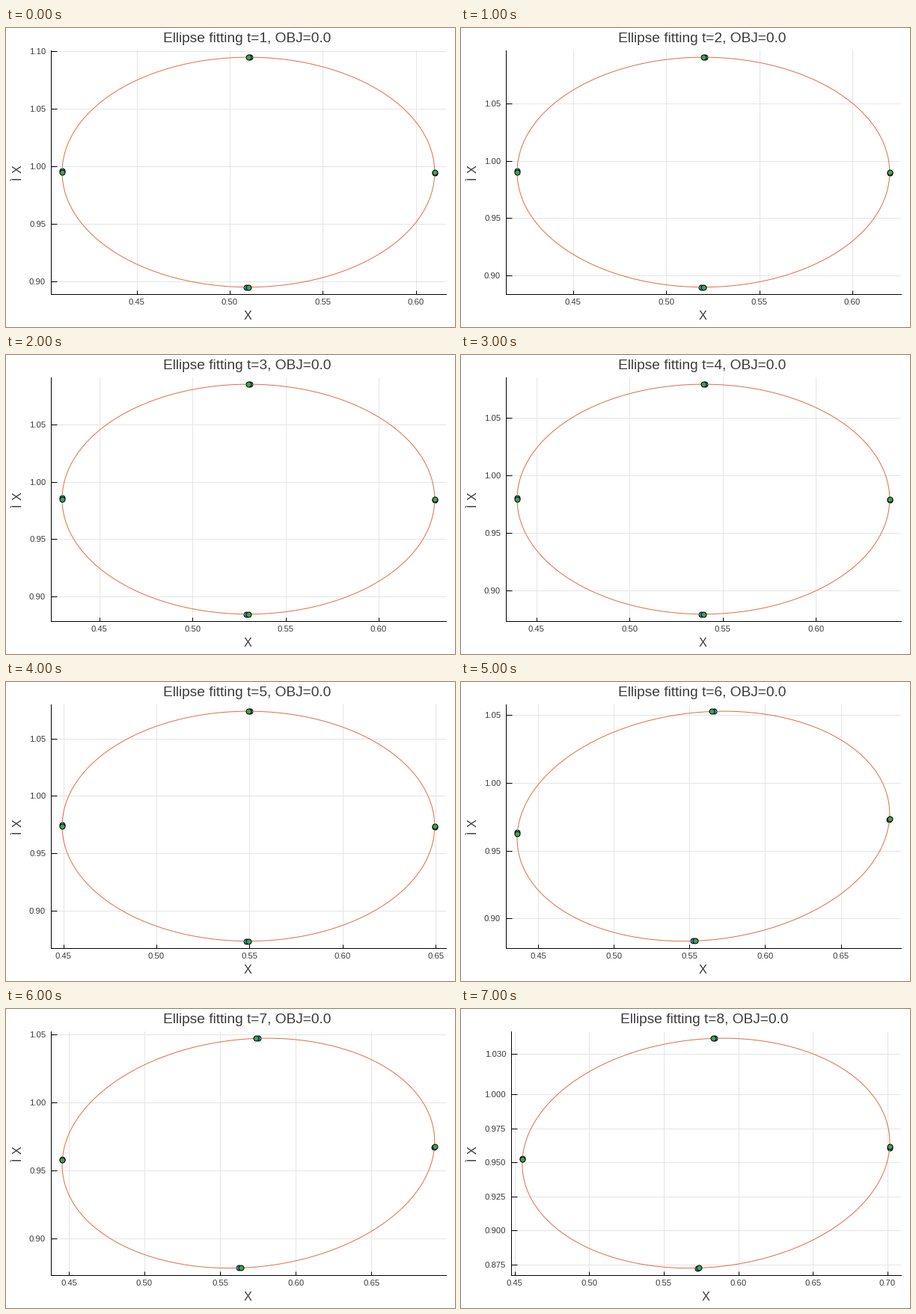
Recreate the animation shown at these times as a matplotlib script. Size 600 px wide and 400 px high, loop 8000 ms.

```python
import numpy as np
import matplotlib.pyplot as plt
from matplotlib.animation import FuncAnimation

W, H, DPI = 600, 400, 100
PX = 72 / DPI                       # points per pixel
RIGHT, TOP, BOTTOM = 587.7, 29.9, 355.9
BLUE, ORANGE, GREEN = "#009afa", "#e26f46", "#3da44d"
INK = "#3a3a3a"
PAD = 1.06                          # axis range relative to the data range
TWIST = 0.01                        # angle between observed and fitted points

CENTERS = [(0.510, 0.995), (0.520, 0.990), (0.530, 0.9848), (0.5396, 0.9793),
           (0.5494, 0.9737), (0.5592, 0.9680), (0.5687, 0.9626), (0.5783, 0.9568)]

plt.rcParams["font.family"] = "Liberation Sans"
fig = plt.figure(figsize=(W / DPI, H / DPI), dpi=DPI, facecolor="white")


def shape(step):
    """Symmetric matrix that maps the unit circle onto the fitted ellipse."""
    if step <= 5:
        return 0.1 * np.eye(2)
    k = step - 6
    skew = 0.0055 - 0.0004 * k
    return np.array([[0.1229 + 0.0001 * k, skew],
                     [skew, 0.0846 - 0.00012 * k]])


def circle(angles):
    return np.array([np.cos(angles), np.sin(angles)])


def label(x, y, text, size, **kw):
    kw = {"ha": "center", "va": "baseline", "color": INK, **kw}
    fig.text(x / W, 1 - y / H, text, fontsize=size * PX, **kw)


def ticks(low, high, gap=0.05):
    return gap * np.arange(np.ceil(low / gap), np.floor(high / gap) + 1)


def dots(ax, points, color, z):
    ax.plot(*points, "o", ms=7 * PX, mfc=color, mec="black", mew=PX, zorder=z)


def draw(i):
    fig.clear()
    step = i + 1
    last = step == 8
    left = 67.1 if last else 60.1
    mid = (left + RIGHT) / 2

    center = np.array(CENTERS[i])
    matrix = shape(step)
    half = np.hypot(matrix[:, 0], matrix[:, 1]) * PAD
    (x0, y0), (x1, y1) = center - half, center + half

    ax = fig.add_axes([left / W, 1 - BOTTOM / H,
                       (RIGHT - left) / W, (BOTTOM - TOP) / H])
    ax.set(xlim=(x0, x1), ylim=(y0, y1))
    ax.set_axisbelow(True)
    ax.spines[["top", "right"]].set_visible(False)
    for side in ("left", "bottom"):
        ax.spines[side].set_linewidth(PX)

    xs = ticks(x0, x1)
    ys = np.append(ticks(y0, 1.001, 0.025), 1.03) if last else ticks(y0, y1)
    ax.set_xticks(xs, [])
    ax.set_yticks(ys, [])
    ax.grid(color="#e5e5e5", lw=PX)
    ax.tick_params(direction="in", width=PX, color="black")
    ax.tick_params(axis="x", length=5 * PX)
    ax.tick_params(axis="y", length=8 * PX)

    for x in xs:
        px = left + (x - x0) / (x1 - x0) * (RIGHT - left)
        label(px, 370, f"{x:.2f}", 11.2)
    for y in ys:
        py = BOTTOM - (y - y0) / (y1 - y0) * (BOTTOM - TOP)
        label(left - 7, py + 4, f"{y:.{3 if last else 2}f}", 11.2, ha="right")

    # observed points, fitted curve, fitted points
    offset = center[:, None]
    quarter = np.arange(4) * np.pi / 2
    dots(ax, offset + matrix @ circle(quarter - TWIST), BLUE, 3)
    curve = offset + matrix @ circle(np.linspace(0, 2 * np.pi, 361))
    ax.plot(*curve, color=ORANGE, lw=PX, zorder=4)
    dots(ax, offset + matrix @ circle(quarter), GREEN, 5)

    label(mid - 2.2, 19, f"Ellipse fitting t={step}, OBJ=0.0", 19.2)
    label(mid - 0.5, 389.5, "X", 16.3)
    label(21, 188.3, "X", 16.3, rotation=90, rotation_mode="anchor")
    label(21, 201.4, "Ì", 16.3, rotation=90, rotation_mode="anchor")
    return []


anim = FuncAnimation(fig, draw, frames=8, interval=1000, repeat=True,
                     repeat_delay=0, blit=False)
plt.show()
```
